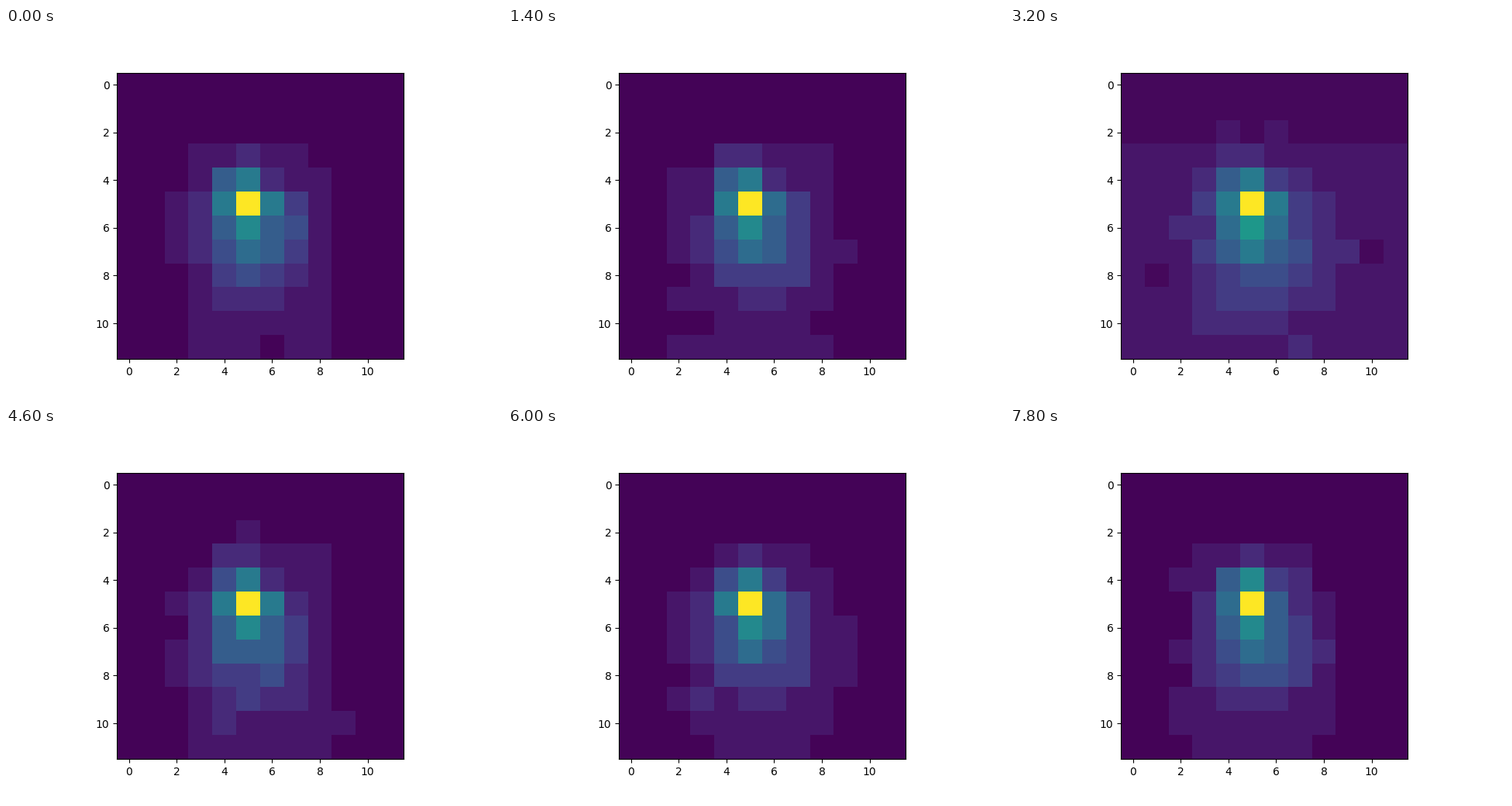
Animation of 640 by 480 pixels, one loop 8000 ms. Source, as a matplotlib script:

```python
import numpy as np
import matplotlib.pyplot as plt
from matplotlib.animation import FuncAnimation

SIZE = 12
STEPS = 40
PEAK = 17                      # level shown in full yellow
HOT = (5, 5)
SURGE = range(16, 20)          # steps when the whole sensor lights up
HOLDS = (4, 19)                # steps that repeat the one before
INNER = (slice(3, 11), slice(2, 9))

rows, cols = np.mgrid[:SIZE, :SIZE]


def bell(amp, row, col, height, width, power=2):
    """Smooth bump; a higher power gives a flatter top and steeper sides."""
    dist = np.abs((rows - row) / height) ** power + np.abs((cols - col) / width) ** power
    return amp * np.exp(-dist)


spot = bell(11, *HOT, 0.77, 0.77)
streak = bell(4, 4.2, 4.55, 1.13, 0.85)
glow = bell(4.6, 6.3, 5.2, 2.12, 1.91)
skirt = bell(1.2, 7.5, 5.3, 4.3, 3.4, power=4)
mean = spot + streak + glow + skirt
haze = 0.8 / (1 + np.exp(-2 * (rows - 2.5)))


def noise(seed):
    return np.random.default_rng(seed).normal(size=(SIZE, SIZE))


def levels(step):
    if step in HOLDS:
        step -= 1
    jitter = noise(step)
    light, floor = mean, 0.15
    if step in SURGE:
        # The surroundings freeze while the middle keeps flickering.
        jitter = noise(SURGE[0])
        jitter[INNER] = noise(step)[INNER]
        light, floor = mean + haze, 0.35
    counts = np.rint(light + jitter * (0.1 + 0.13 * np.sqrt(light)))
    counts[HOT] = PEAK
    return np.maximum(counts, floor) / PEAK


fig, ax = plt.subplots(figsize=(6.4, 4.8), dpi=100)
image = ax.imshow(levels(0), cmap="viridis", vmin=0, vmax=1)


def draw(step):
    image.set_data(levels(step))
    return (image,)


anim = FuncAnimation(fig, draw, frames=STEPS, interval=200,
                     repeat=True, repeat_delay=0)
plt.show()
```
